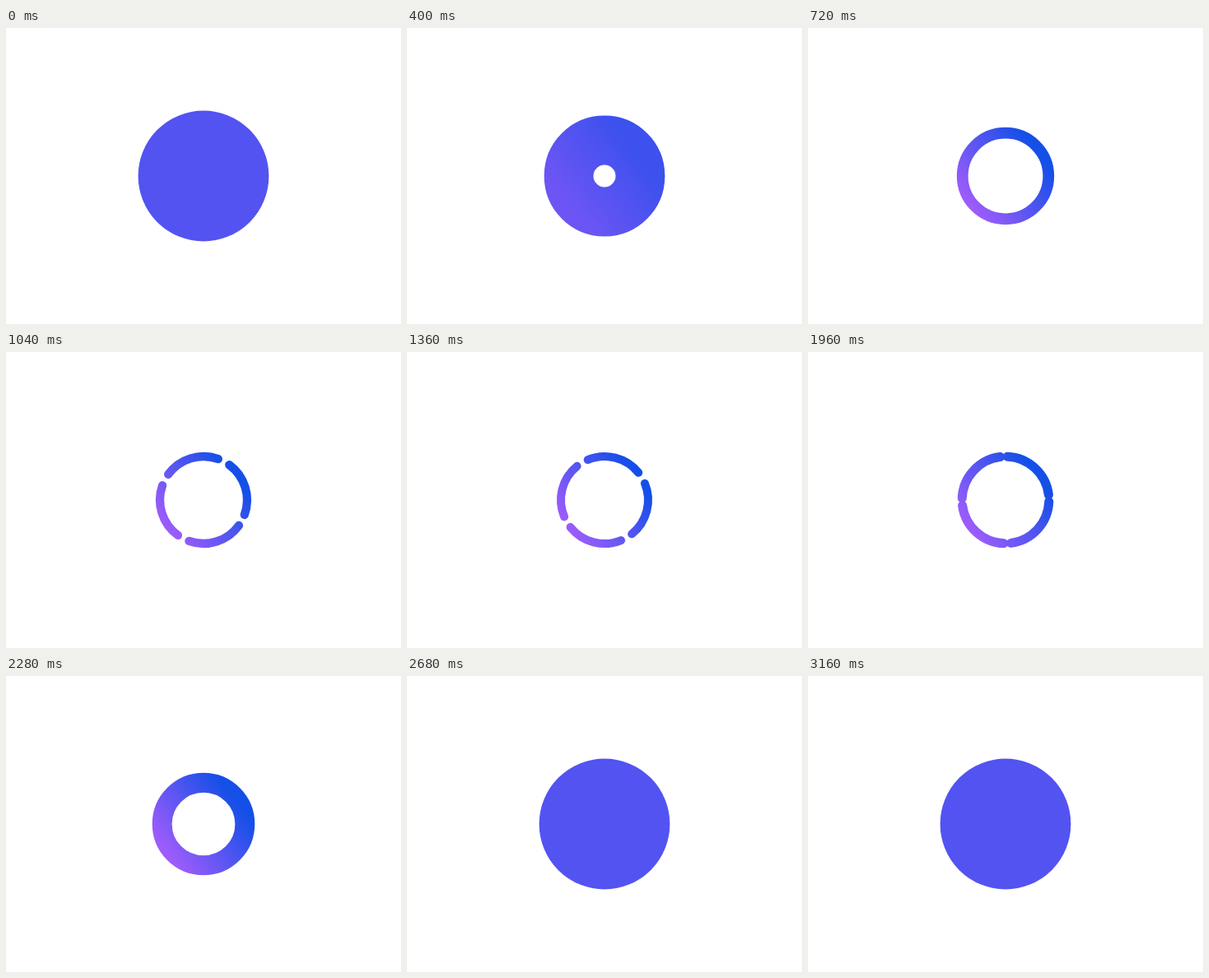
These frames come from a looping animation (480x360 px, 3320 ms). An HTML page:

```html
<!DOCTYPE html>
<html lang="en">
<head>
<meta charset="utf-8">
<title>Loader</title>
<style>
  html, body { margin: 0; width: 100%; height: 100%; overflow: hidden; background: #fff; }
  svg { display: block; width: 100%; height: 100%; }
  circle { fill: none; stroke-linecap: round; }
</style>
</head>
<body>
<svg viewBox="0 0 480 360">
  <defs>
    <linearGradient id="tint" gradientUnits="userSpaceOnUse" x1="195" y1="213" x2="279" y2="150">
      <stop offset="0" stop-color="#9c5cfb"/>
      <stop offset="1" stop-color="#144fe7"/>
    </linearGradient>
    <mask id="arcs" maskUnits="userSpaceOnUse" x="0" y="0" width="480" height="360">
      <circle id="ring" cx="240" cy="180" stroke="#fff"/>
    </mask>
  </defs>
  <g mask="url(#arcs)">
    <rect width="480" height="360" fill="url(#tint)"/>
    <rect id="flat" width="480" height="360" fill="#5353f1"/>
  </g>
</svg>
<script>
  const LOOP = 3320;
  const OPEN = 360, CLOSE = 2480, DECAY = 124;
  const SPIN_START = 827, SPIN_END = 2027;
  const GAP = 16.5, GAP_FADE = 115;

  const ring = document.getElementById('ring');
  const flat = document.getElementById('flat');
  const clamp = x => Math.min(1, Math.max(0, x));
  const mix = (a, b, k) => a + (b - a) * k;

  // 1 is the solid disc, 0 the thinnest ring
  function solidity(t) {
    if (t <= OPEN || t >= CLOSE) return 1;
    return Math.exp(-Math.min(t - OPEN, CLOSE - t) / DECAY);
  }

  function draw(t) {
    const solid = solidity(t);
    const turn = clamp((t - SPIN_START) / (SPIN_END - SPIN_START));
    const angle = 180 * (1 - Math.cos(Math.PI * turn));
    const gap = GAP * clamp(Math.min(t - SPIN_START, SPIN_END - t) / GAP_FADE);
    const radius = mix(53, 39.7, solid);
    const degree = radius * Math.PI / 180;

    ring.setAttribute('r', radius);
    ring.setAttribute('stroke-width', mix(10, 79.4, solid));
    ring.setAttribute('stroke-dasharray',
      gap ? `${(90 - gap) * degree} ${gap * degree}` : 'none');
    ring.setAttribute('transform', `rotate(${angle + gap / 2} 240 180)`);
    flat.setAttribute('opacity', clamp((solid - 0.2) / 0.8));
  }

  const start = performance.now();
  function tick() {
    draw((performance.now() - start) % LOOP);
    requestAnimationFrame(tick);
  }
  tick();
</script>
</body>
</html>
```
